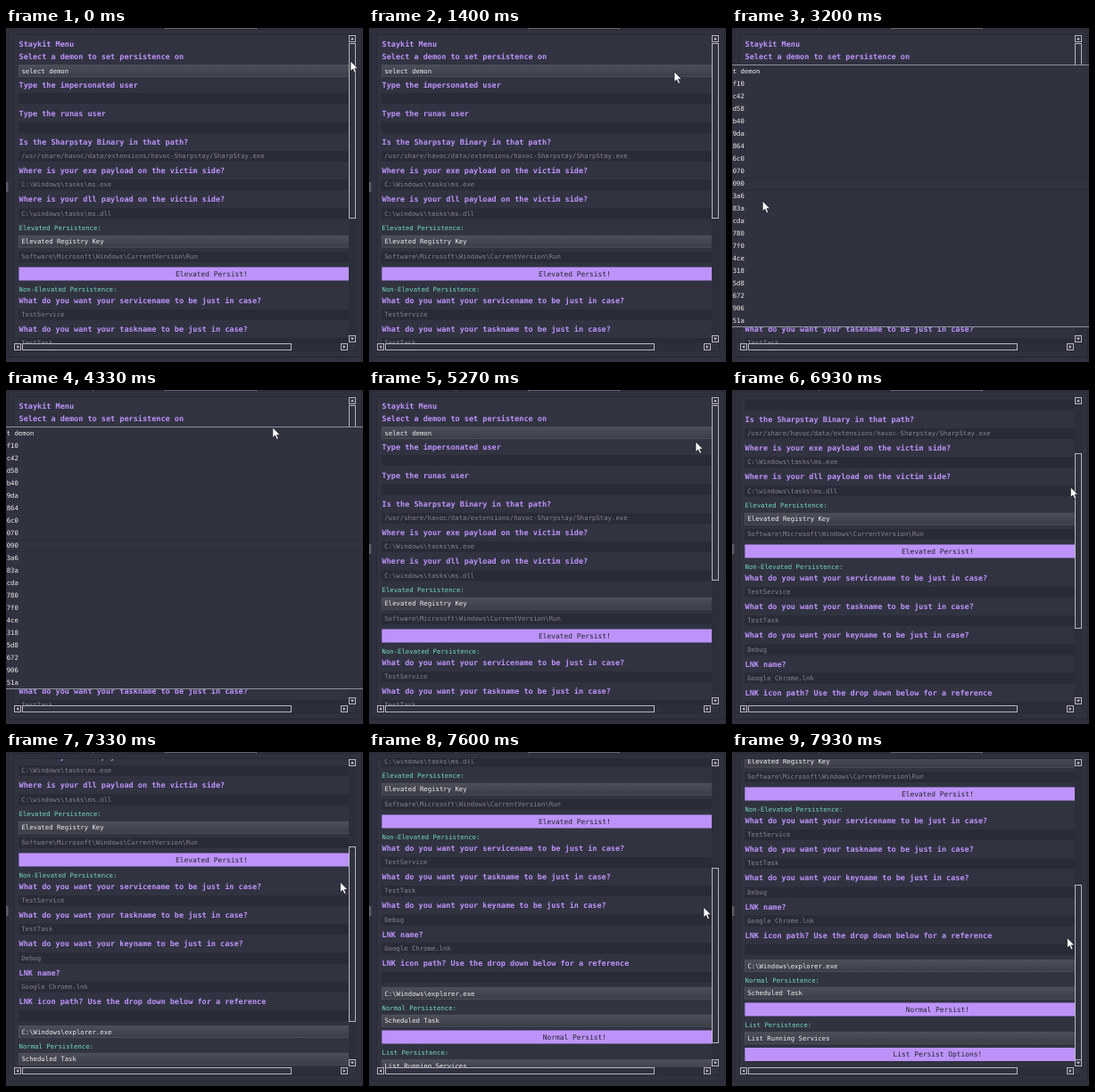
These frames come from a looping animation (400x375 px, 8 s). An HTML page:

```html
<!DOCTYPE html>
<html lang="en">
<head>
<meta charset="utf-8">
<title>Persistence menu</title>
<style>
  html, body { margin: 0; width: 100%; height: 100%; overflow: hidden; background: #2f313e; }
  svg { display: block; width: 100vw; height: 100vh; }
  text { font-family: "DejaVu Sans Mono", monospace; font-size: 7.31px; text-rendering: geometricPrecision; }
  .label { font-size: 8.53px; font-weight: bold; fill: #bd93f9; }
  .section { fill: #72d8c0; }
  .hint { fill: #83848b; }
  .value { fill: #eeeeec; }
  .action { font-size: 7.92px; fill: #25242f; text-anchor: middle; }
  .bar { fill: #30323f; stroke: #b6b7bd; stroke-width: 1; }
  .arrow { fill: #c4c5ca; }
</style>
</head>
<body>
<svg id="stage" viewBox="0 0 400 375" preserveAspectRatio="none">
  <defs>
    <linearGradient id="combo" x1="0" y1="0" x2="0" y2="1">
      <stop offset="0" stop-color="#4c4e59"/>
      <stop offset="1" stop-color="#3b3d49"/>
    </linearGradient>
    <clipPath id="view"><rect x="9" y="8" width="375" height="346"/></clipPath>
  </defs>
  <rect width="400" height="375" fill="#2f313e"/>
  <path d="M0 1.5H400M2.5 3V369.5H398.5V3" fill="none" stroke="#262833"/>
  <path d="M97.5 0V2M178.5 0V2M280.5 0V2" stroke="#50525d"/>
  <path d="M178 .5H281" stroke="#666872"/>
  <rect x="0" y="173" width="2.5" height="11" fill="#5b5d68"/>
  <rect x="8.5" y="7.5" width="384" height="355" fill="#313341" stroke="#282a35"/>
  <g clip-path="url(#view)"><g id="form"></g></g>
  <g id="scrollbars">
    <rect x="384" y="8" width="9" height="346" fill="#2c2e3a"/>
    <rect x="9" y="354" width="375" height="8" fill="#2c2e3a"/>
    <rect class="bar" x="18.5" y="354.5" width="301" height="7"/>
    <rect class="bar" id="thumb" x="384.5" y="17" width="7" height="196"/>
  </g>
  <g id="popup">
    <rect x="0" y="41" width="400" height="295" fill="#30323f"/>
    <path d="M0 41.5H400M0 335.5H400" stroke="#8f909a"/>
    <path id="hover" d="M0 168.5H400M0 181.5H400" stroke="#292b36"/>
  </g>
  <path id="cursor" d="M0 0V11.5L2.7 9.1L4.6 13.4L6.5 12.5L4.7 8.4H8.3Z" fill="#fff" stroke="#15161c" stroke-width=".7"/>
</svg>
<script>
const LOOP = 8000;
const POPUP_OPEN = 1530, POPUP_CLOSE = 4870, HOVER_START = 2600;
const THUMB_TOP = 17, THUMB_RATIO = 132 / 229;
const NS = "http://www.w3.org/2000/svg";
const $ = id => document.getElementById(id);

function add(parent, tag, attrs, content) {
  const el = document.createElementNS(NS, tag);
  for (const key in attrs) el.setAttribute(key, attrs[key]);
  if (content) el.textContent = content;
  parent.appendChild(el);
  return el;
}

// Each row: kind, vertical centre, text
const rows = [
  ["label", 18, "Staykit Menu"],
  ["label", 32, "Select a demon to set persistence on"],
  ["combo", 48.5, "select demon"],
  ["label", 64, "Type the impersonated user"],
  ["field", 79, ""],
  ["label", 96, "Type the runas user"],
  ["field", 111.5, ""],
  ["label", 128, "Is the Sharpstay Binary in that path?"],
  ["field", 144, "/usr/share/havoc/data/extensions/havoc-Sharpstay/SharpStay.exe"],
  ["label", 160, "Where is your exe payload on the victim side?"],
  ["field", 176, String.raw`C:\Windows\tasks\ms.exe`],
  ["label", 192.5, "Where is your dll payload on the victim side?"],
  ["field", 208.5, String.raw`C:\windows\tasks\ms.dll`],
  ["section", 224.5, "Elevated Persistence:"],
  ["combo", 240, "Elevated Registry Key"],
  ["field", 257, String.raw`Software\Microsoft\Windows\CurrentVersion\Run`],
  ["action", 276, "Elevated Persist!"],
  ["section", 293.5, "Non-Elevated Persistence:"],
  ["label", 306.5, "What do you want your servicename to be just in case?"],
  ["field", 322, "TestService"],
  ["label", 338.5, "What do you want your taskname to be just in case?"],
  ["field", 354, "TestTask"],
  ["label", 370.5, "What do you want your keyname to be just in case?"],
  ["field", 386.5, "Debug"],
  ["label", 403, "LNK name?"],
  ["field", 418.5, "Google Chrome.lnk"],
  ["label", 435, "LNK icon path? Use the drop down below for a reference"],
  ["field", 451, ""],
  ["combo", 469.5, String.raw`C:\Windows\explorer.exe`],
  ["section", 485, "Normal Persistence:"],
  ["combo", 500, "Scheduled Task"],
  ["action", 518, "Normal Persist!"],
  ["section", 535.5, "List Persistence:"],
  ["combo", 550.5, "List Running Services"],
  ["action", 568.5, "List Persist Options!"]
];

const box = (y, height, attrs) =>
  add($("form"), "rect", { x: 14.4, y: y - height / 2, width: 432, height, ...attrs });
const write = (cls, x, y, text) => add($("form"), "text", { class: cls, x, y }, text);

const draw = {
  label: (y, text) => write("label", 14.5, y + 2.5, text),
  section: (y, text) => write("section", 14.5, y + 2.7, text),
  field(y, text) {
    box(y, 12, { fill: "#292b36" });
    write("hint", 17.2, y + 2.4, text);
  },
  combo(y, text) {
    box(y - .3, 13, { fill: "url(#combo)", stroke: "#555761", "stroke-width": .7 });
    write("value", 17.4, y + 2.4, text);
  },
  action(y, text) {
    box(y, 15, { fill: "#bd93f9" });
    write("action", 230.4, y + 2.9, text);
  }
};
rows.forEach(([kind, y, text]) => draw[kind](y, text));

const arrowButton = (x, y, angle) => {
  const g = add($("scrollbars"), "g", { transform: `translate(${x} ${y}) rotate(${angle})` });
  add(g, "rect", { class: "bar", x: -3.5, y: -3.5, width: 7, height: 7 });
  add(g, "path", { class: "arrow", d: "M-2 1.2L0 -1.4L2 1.2Z" });
};
arrowButton(388, 12, 0);
arrowButton(388, 349, 180);
arrowButton(13, 358, -90);
arrowButton(379, 358, 90);

"t demon,f10,c42,d58,b40,9da,864,6c0,070,090,3a6,83a,cda,780,7f0,4ce,318,5d8,672,906,51a"
  .split(",")
  .forEach((text, i) => add($("popup"), "text", { class: "value", x: .7, y: 51.2 + i * 14 }, text));

// Keys: time, then values
const cursorKeys = [
  [0, 386, 37], [500, 378, 41], [1200, 342, 49], [2000, 342, 49],
  [2400, 230, 110], [2850, 82, 166], [3200, 34.3, 194], [3420, 29, 250],
  [3670, 50, 326], [3900, 110, 250], [4300, 300, 45], [4600, 288, 16],
  [4800, 288, 16], [5270, 366, 58], [5730, 386, 45], [6000, 386, 45],
  [6270, 385, 53], [6530, 384.3, 72], [7330, 374.5, 146], [7930, 375.5, 208.5]
];
const scrollKeys = [[6270, 0], [6530, 34], [7330, 155], [7800, 229]];

function sample(keys, t) {
  const next = keys.findIndex(key => key[0] > t);
  if (next === 0) return keys[0].slice(1);
  if (next < 0) return keys[keys.length - 1].slice(1);
  const [t0, ...from] = keys[next - 1];
  const [t1, ...to] = keys[next];
  const k = (t - t0) / (t1 - t0);
  return from.map((v, i) => v + (to[i] - v) * k);
}

function render(t) {
  const [x, y] = sample(cursorKeys, t);
  const [scroll] = sample(scrollKeys, t);
  $("cursor").setAttribute("transform", `translate(${x} ${y})`);
  $("form").setAttribute("transform", `translate(0 ${-Math.round(scroll)})`);
  $("thumb").setAttribute("y", Math.floor(THUMB_TOP + scroll * THUMB_RATIO) + .5);
  $("popup").style.display = t >= POPUP_OPEN && t < POPUP_CLOSE ? "" : "none";
  $("hover").style.display = t >= HOVER_START ? "" : "none";
}

const start = performance.now();
function tick() {
  render((performance.now() - start) % LOOP);
  requestAnimationFrame(tick);
}
tick();
</script>
</body>
</html>
```
